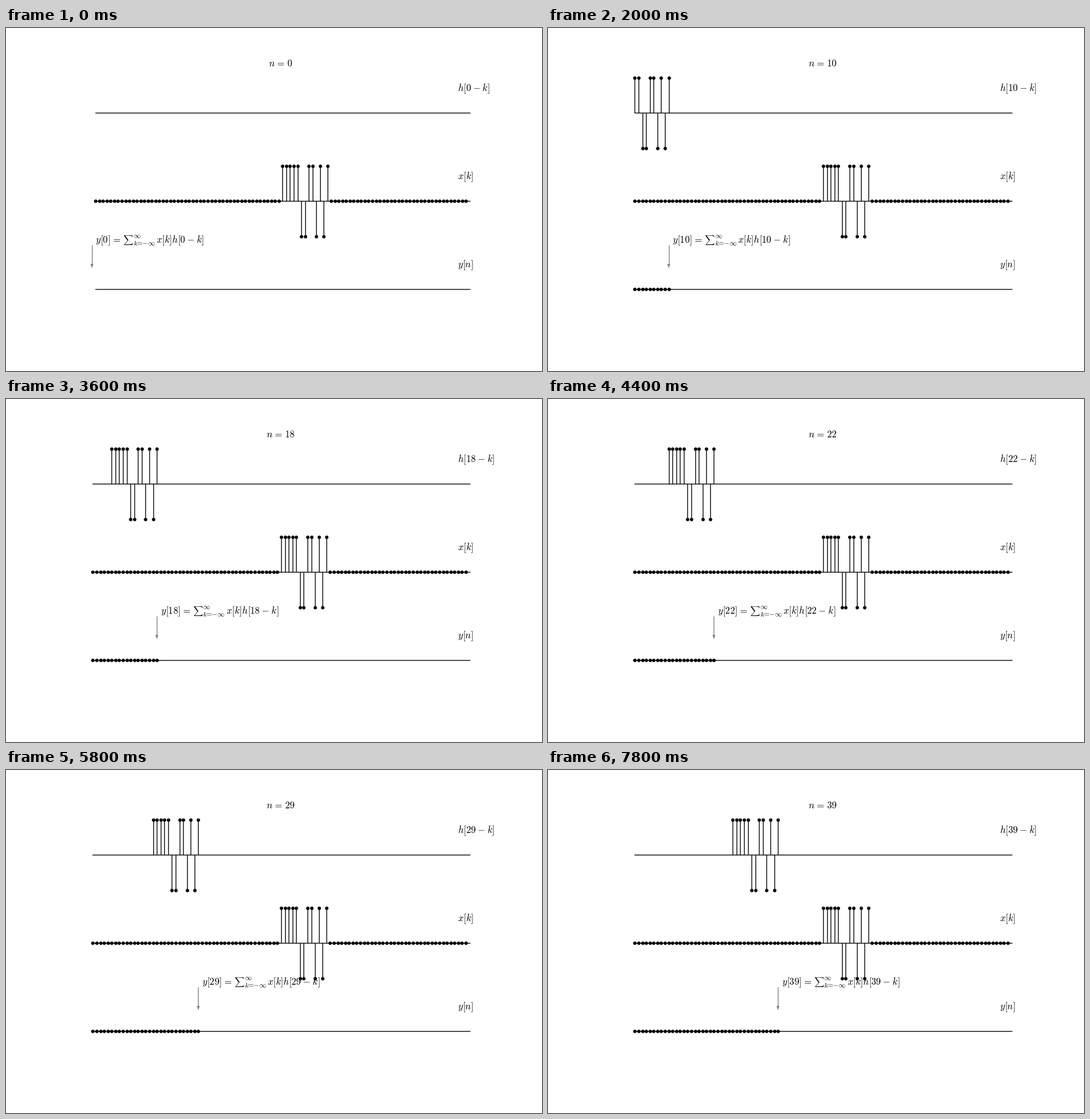
A matplotlib script that plays this animation: 935 by 599 pixels, repeating every 8 s.

```python
import numpy as np
import matplotlib.pyplot as plt
from matplotlib.animation import FuncAnimation

W, H = 935, 599
FRAMES = 40
ROWS = (148.4, 302.1, 455.9)       # zero level of h, x and y
UNIT = 61.5                        # pixels per unit of amplitude
BARKER = np.array([1, 1, 1, 1, 1, -1, -1, 1, 1, -1, 1, -1, 1])
SAMPLES, START = 100, 50

# extra space that brings relations and binary operators to TeX widths
EQ = r"\hspace{0.116}=\hspace{0.116}"
MINUS = r"\hspace{0.053}-\hspace{0.053}"
TIGHT_EQ = r"\hspace{-0.2}=\hspace{-0.2}"

plt.rcParams["mathtext.fontset"] = "cm"
fig = plt.figure(figsize=(W / 100, H / 100), dpi=100, facecolor="white")
ax = fig.add_axes([0, 0, 1, 1])

signal = np.zeros(SAMPLES)
signal[START:START + len(BARKER)] = BARKER


def scale(n):
    """Pixel position of sample 0 and the step between samples."""
    low = -1 if n == 0 else -0.25
    step = 0.775 * W / (1.1 * (SAMPLES - low))
    return 0.125 * W + step * (0.05 * (SAMPLES - low) - low), step


def math(x, y, s, size=12, ha="left"):
    ax.text(x, y, f"${s}$", fontsize=size, ha=ha, va="baseline", color="black")


def stems(xs, values, base):
    ys = base - UNIT * np.asarray(values, float)
    tall = ys != base
    ax.vlines(xs[tall], base, ys[tall], color="black", lw=1)
    ax.plot(xs, ys, "o", color="black", ms=3.3, mew=1)


def arrow(x, top, tip):
    ax.plot([x, x], [top, tip - 6], color="gray", lw=1, solid_capstyle="butt")
    ax.fill([x - 2.5, x + 2.5, x], [tip - 7.5, tip - 7.5, tip],
            color="gray", lw=0)


def formula(x, y, n):
    shift = 8.16 * (len(str(n)) - 1)
    math(x, y, f"y[{n}]{EQ}")
    math(x + 47.8 + shift, y, r"\sum", 8.6)
    math(x + 65.4 + shift, y - 8.2, r"\infty", 8.7)
    math(x + 65.4 + shift, y + 5, rf"k{TIGHT_EQ}{{-}}\infty", 8.7)
    math(x + 105.9 + shift, y, f"x[k]h[{n}{MINUS}k]")


def draw(n):
    ax.clear()
    ax.set_xlim(0, W)
    ax.set_ylim(H, 0)
    ax.axis("off")
    x0, step = scale(n)

    def pos(k):
        return x0 + step * np.asarray(k)

    for base in ROWS:
        ax.plot(pos([0, SAMPLES]), [base, base], color="black", lw=1)

    k = np.arange(max(0, n - len(BARKER)), n)
    stems(pos(k), BARKER[k - n + len(BARKER)], ROWS[0])
    stems(pos(np.arange(SAMPLES)), signal, ROWS[1])
    done = np.convolve(signal, BARKER)[:n]
    stems(pos(np.arange(n)), done, ROWS[2])

    math(479.2, 67, f"n{EQ}{n}", ha="center")
    labels = (f"h[{n}{MINUS}k]", "x[k]", "y[n]")
    for base, label in zip(ROWS, labels):
        math(788.2, base - 38.2, label)

    arrow(pos(n - 1), 379.3, 419.5)
    formula(pos(n), 374.8, n)
    return []


anim = FuncAnimation(fig, draw, frames=FRAMES, init_func=lambda: draw(0),
                     interval=200, repeat=True, repeat_delay=0, blit=False)
plt.show()
```
